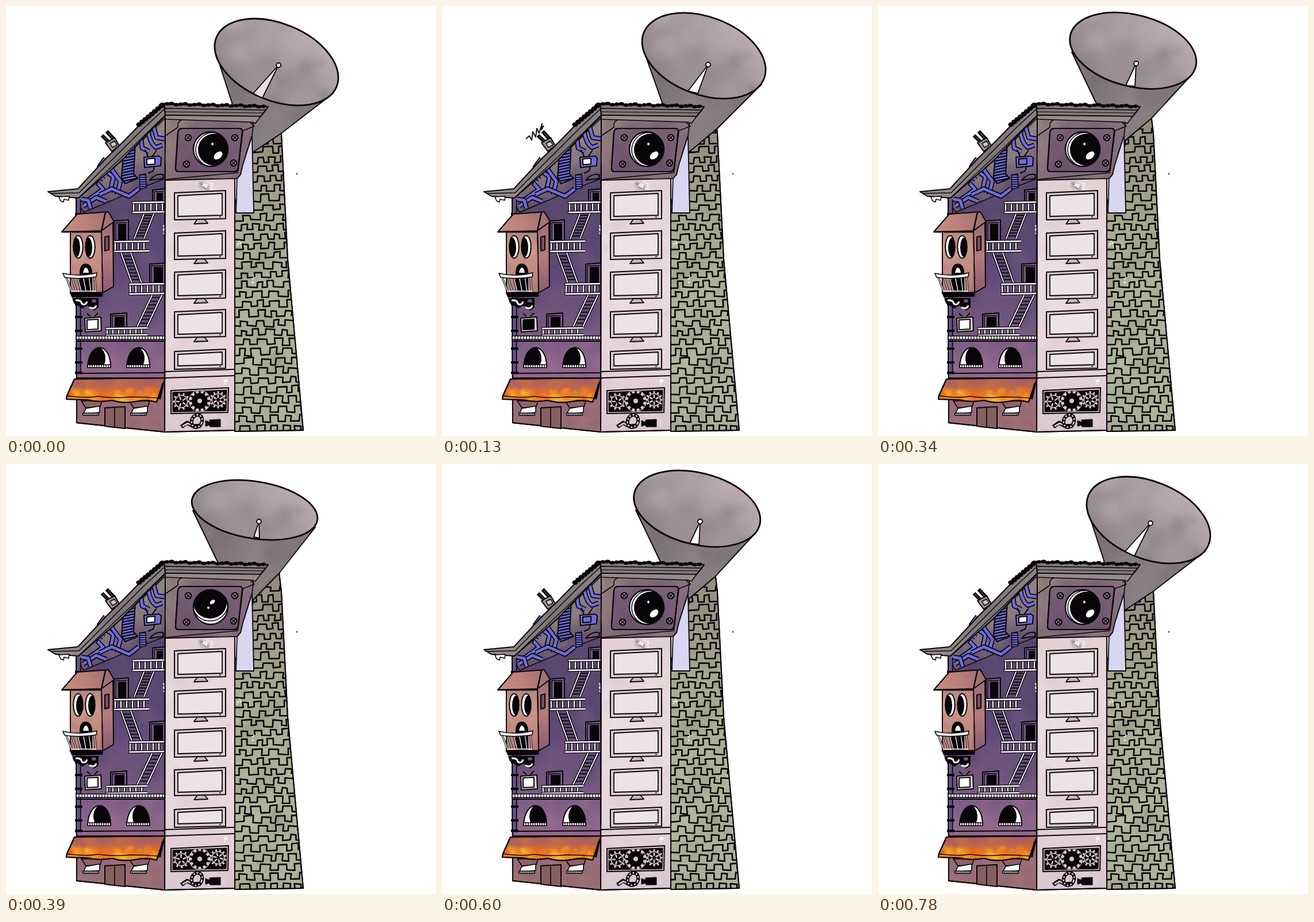
Recreate the animation shown at these times as an HTML page with a canvas. Size 748 px wide and 748 px high, loop 0.91 s.

```html
<!DOCTYPE html>
<html>
<head>
<meta charset="utf-8">
<style>
html, body { margin: 0; width: 100%; height: 100%; overflow: hidden; background: #fff; }
canvas { display: block; width: 100vmin; height: 100vmin; }
</style>
</head>
<body>
<canvas id="stage" width="748" height="748"></canvas>
<script>
const ctx = document.getElementById('stage').getContext('2d');
const STEP = 130, STEPS = 7, INK = '#080508', WHITE = '#fff', BLUE = '#6f6cda';

let seed;
const rnd = () => (seed = (seed * 16807) % 2147483647) / 2147483647;

function shape(d, fill, width = 2, ink = INK) {
  const path = typeof d === 'string' ? new Path2D(d) : d;
  if (fill) { ctx.fillStyle = fill; ctx.fill(path); }
  if (width) { ctx.strokeStyle = ink; ctx.lineWidth = width; ctx.stroke(path); }
  return path;
}
const line = (d, width = 2, ink = INK) => shape(d, null, width, ink);
const poly = (pts, fill, width, ink) => shape(`M${pts}Z`, fill, width, ink);
function oval(x, y, rx, ry, fill, width = 2, angle = 0, ink = INK) {
  const path = new Path2D();
  path.ellipse(x, y, rx, ry, angle, 0, 7);
  return shape(path, fill, width, ink);
}
function fade(x0, y0, x1, y1, ...colors) {
  const g = ctx.createLinearGradient(x0, y0, x1, y1);
  colors.forEach((c, i) => g.addColorStop(i / (colors.length - 1), c));
  return g;
}
function within(path, draw) {
  ctx.save();
  ctx.clip(path);
  draw();
  ctx.restore();
}

// Soft watercolour blotches inside a path; colours are "r,g,b".
function mottle(path, box, colors, count, size, alpha = .3) {
  const [x0, y0, w, h] = box;
  within(path, () => {
    for (let i = 0; i < count; i++) {
      const x = x0 + rnd() * w, y = y0 + rnd() * h, r = size * (.4 + rnd());
      const c = colors[i % colors.length];
      const g = ctx.createRadialGradient(x, y, 0, x, y, r);
      g.addColorStop(0, `rgba(${c},${alpha})`);
      g.addColorStop(1, `rgba(${c},0)`);
      ctx.fillStyle = g;
      ctx.fillRect(x - r, y - r, 2 * r, 2 * r);
    }
  });
}

function specks(x, y, w, h, count) {
  ctx.fillStyle = WHITE;
  for (let i = 0; i < count; i++)
    ctx.fillRect(x + rnd() * w, y + rnd() * h, 1 + rnd() * 2, 1 + rnd() * 2);
}

// Rim ellipse, cone edges (top and bottom ends), rod base and tip.
const DISHES = [
  { rim: [470.5, 97.5, 113, 67, .39], left: '364,78 393,168', right: '430,254 478,222 569,152', base: '430,152 446,160', tip: [474, 103] },
  { rim: [455.5, 86.5, 112, 67.6, .36], left: '349,72 383,168', right: '430,254 480,212 556,136', base: '428,148 445,152', tip: [463, 102] },
  { rim: [443.7, 77.7, 112.5, 62.2, .25], left: '337,80 380,170', right: '430,234 475,196 547,118', base: '431,138 447,140', tip: [449, 100] },
  { rim: [432.5, 80, 110.5, 49.5, .16], left: '325,81 367,168', right: '430,236 475,190 538,110', base: '431,127 441,129', tip: [440, 100] }
];

function tower() {
  const wall = poly('398,345 430,240 430,180 474,180 479,222 490,440 517,738 398,740',
    fade(0, 200, 0, 740, '#918c7e', '#a7aa90', '#afb499', '#a8b096'));
  mottle(wall, [398, 200, 120, 540], ['140,138,118', '188,194,168', '166,166,144'], 90, 24);
  within(wall, () => {
    for (let y = 218; y < 745; y += 16.7) {
      let up = 1, x = (y < 366 ? 426 : 394) + rnd() * 6;
      let d = `M${x - 8} ${y}`;
      while (x < 522) {
        const top = y + up * (3.5 + rnd() * 3) - (x - 400) * .02;
        d += `L${x} ${top}`;
        x += 8 + rnd() * 10;
        d += `L${x} ${top + rnd() * 3 - 1.5}`;
        x += rnd() * 3 - 1.5;
        up = -up;
      }
      line(d, 2.6);
    }
  });
  shape(wall, null);
  specks(401, 405, 8, 14, 8);
  specks(427, 470, 6, 10, 4);
}

function dish({ rim, left, right, base, tip }, rod) {
  const [x, y, rx, ry, angle] = rim;
  const cone = poly(`${left} 405,240 ${right}`, fade(x - 70, 150, x + 70, 190, '#7e7377', '#8a8084', '#7f767a'));
  mottle(cone, [350, 100, 200, 140], ['105,96,100', '155,145,149'], 25, 26, .22);
  const bowl = oval(x, y, rx, ry, fade(x - 85, y + 50, x + 40, y - 50, '#8d8286', '#a0959a', '#b8a9b0'), 0, angle);
  mottle(bowl, [x - 100, y - 75, 200, 75], ['190,174,182', '160,148,153'], 40, 27);
  mottle(bowl, [x - 100, y, 200, 75], ['130,120,124', '165,152,158'], 40, 25);
  oval(x, y, rx, ry, null, 2.8, angle);
  poly(`${base} ${tip}`, rod, 1.8);
  oval(...tip, 4, 4, rod || '#b5a8ae', 1.8);
}

function roof() {
  poly('275,171 456,175 452,181 443,192 277,190', '#827a79');
  poly('277,190 443,192 434,204 428,202 277,197', '#968c88', 1.5);
  poly('275,171 236,203 205,235 175,264 125,318 73,323 86,331 126,334 200,270 277,190', fade(277, 180, 100, 330, '#8a8283', '#7d7577', '#958d8d'));
  line('M277 178L452 181M277 178L240 212L127 325L78 326', 1.5);
  line('M277 184L447 186M277 190L213 252L130 330', 1.2);
  for (let i = 0; i < 23; i++) oval(272 + i * 8, 171 + i * .2 - (i % 3), 5, 3, INK, 0);
  for (let i = 0; i < 8; i++) oval(270 - i * 5.5, 174 + i * 4.6, 5, 4, INK, 0);
  shape('M92 332L110 331L109 338L101 336L100 341L95 339Z', WHITE, 1.6);
}

function pipe(d) {
  line(d, 8.5);
  line(d, 5, BLUE);
}

function pipes(tvLit) {
  const band = poly('277,195 277,300 236,316 135,359 122,336 200,270', fade(200, 240, 235, 310, '#928785', '#83747c', '#63506e'), 1.5);
  mottle(band, [130, 200, 147, 150], ['105,86,118', '152,140,138', '122,106,120'], 50, 18);
  ['M234 226L237 247L249 253', 'M247 213Q249 238 261 246L272 242', 'M257 211L262 229L276 231',
   'M173 265L162 280L187 297L181 324', 'M150 298L169 319L141 339', 'M199 259L183 283L199 305L193 328',
   'M134 348L157 333L174 340', 'M163 328L184 318L214 331L231 318', 'M147 352L143 338L131 336', 'M170 302L160 294L154 311'].forEach(pipe);
  const ladder = poly('204,258 225,238 222,292 229,300 207,309 201,298', BLUE);
  within(ladder, () => {
    for (let y = 236; y < 312; y += 5) line(`M198 ${y + 5}L232 ${y - 2}`, 2.4);
  });
  const coil = poly('232,294 243,292 244,316 233,319', BLUE, 1.5);
  within(coil, () => { for (let y = 294; y < 320; y += 4) line(`M230 ${y}L246 ${y}`, 1.5); });
  line('M247 262L242 250M254 262L262 251M258 280L256 287L247 291');
  poly('240,263 266,261 270,264 269,278 241,281', BLUE);
  poly('245,266 259,265 259,275 245,276', tvLit ? WHITE : '#7770c4', 2);
  shape('M250 303Q262 289 274 294L273 300Z', '#6c5872');
}

function chimney(sparking) {
  poly('173,238 189,229 197,243 184,253', '#988d8b');
  poly('181,239 189,235 193,242 185,246', '#d2c8c6', 1.5);
  line('M167 225L178 236M175 218L187 231', 6.5);
  line('M169 227L177 235M177 220L185 229', 1, '#77706f');
  if (sparking) line('M146 231L152 226L156 233L158 219L163 228L165 213L169 221L174 205L173 215L177 208', 1.9);
}

function doorway(x, y, w, h) {
  poly(`${x},${y + 2} ${x + w},${y} ${x + w},${y + h} ${x},${y + h}`, '#725a82');
  ctx.fillStyle = INK;
  ctx.fillRect(x + 7, y + 7, w - 11, h - 7);
  line(`M${x + 3} ${y + h}V${y + 5}H${x + w - 3}`, 1.3);
}

function rail(x0, x1, y, h) {
  for (let x = x0 + 3; x < x1; x += 10) {
    line(`M${x} ${y}V${y + h}`, 4.6);
    line(`M${x} ${y}V${y + h}`, 2.2, WHITE);
  }
  for (const dy of [0, h]) {
    line(`M${x0} ${y + dy + 1}L${x1} ${y + dy}`, 5);
    line(`M${x0 + 1} ${y + dy + 1}L${x1} ${y + dy}`, 2.5, WHITE);
  }
}

function stairs(x0, y0, x1, y1) {
  const w = 17;
  for (let i = 1; i < 9; i++) {
    const x = x0 + (x1 - x0) * i / 9, y = y0 + (y1 - y0) * i / 9;
    line(`M${x} ${y}h${w}`, 1.8);
  }
  for (const dx of [0, w]) {
    const d = `M${x0 + dx} ${y0}L${x1 + dx} ${y1}`;
    line(d, 4.4);
    line(d, 1.8, WHITE);
  }
}

function arch(cx, lookRight) {
  const dome = shape(`M${cx - 20} 628C${cx - 18} 583 ${cx + 20} 583 ${cx + 20} 628Z`, WHITE, 0);
  within(dome, () => oval(cx + (lookRight ? 8 : -7), 613, 18, 22, INK, 0));
  shape(dome, null, 2);
  hatch(cx - 20, 624, 40, 5);
}

function hatch(x, y, w, h, gap = 4) {
  ctx.fillStyle = WHITE;
  ctx.fillRect(x, y, w, h);
  for (let i = 0; i <= w; i += gap) line(`M${x + i} ${y}v${h}`, 1.3);
  line(`M${x} ${y}h${w}v${h}h${-w}z`, 1.3);
}

function sideWall(pose) {
  const wall = poly('277,190 276,741 123,725 122,334 200,270',
    fade(0, 300, 0, 730, '#5d4a70', '#59466e', '#62497a', '#75587f', '#916a8c', '#9a6e74'));
  mottle(wall, [122, 300, 155, 280], ['82,64,104', '116,92,132', '80,70,114', '118,88,118'], 80, 22);
  mottle(wall, [122, 583, 155, 58], ['162,112,150', '124,94,150', '140,98,128'], 45, 16);
  mottle(wall, [122, 685, 155, 50], ['168,118,114', '138,94,104'], 25, 15);
  shape(wall, null);
  specks(273, 375, 3, 22, 12);
  pipes(pose.tv);

  line('M126 337V641', 9);
  line('M126 337V641', 5.5, '#64538a');
  for (const y of [362, 519, 541, 565, 596, 620, 638]) line(`M120 ${y}h13`, 4);
  doorway(255, 318, 22, 24);
  doorway(188, 372, 25, 36);
  doorway(250, 447, 27, 36);
  doorway(182, 534, 28, 27);
  stairs(241, 359, 223, 405);
  stairs(200, 429, 219, 482);
  stairs(255, 501, 228, 558);
  rail(219, 277, 341, 17);
  rail(187, 249, 409, 17);
  rail(213, 277, 483, 17);
  rail(173, 246, 560, 12);
  hatch(122, 574, 155, 6, 5);
  line('M122 583H277M122 639L277 638M122 647L277 647');
  arch(162, pose.lookRight);
  arch(230, pose.lookRight);
  poly('137,543 165,541 166,565 138,567', '#d8cbd0');
  poly('141,546 160,545 160,562 141,563', pose.lamp ? WHITE : INK);
  line('M141 535L147 540M160 534L154 540', 2);
}

function faceHouse(lookRight) {
  poly('166,391 186,374 187,488 168,499', fade(0, 380, 0, 490, '#9d6f78', '#b67c7c', '#8e6074'));
  const front = poly('112,391 166,391 168,499 112,500', fade(0, 390, 0, 500, '#b5847c', '#c99a8e', '#c0877f', '#b1747a'));
  mottle(front, [112, 390, 56, 110], ['212,162,146', '172,120,120', '202,138,120'], 28, 13);
  poly('97,393 124,362 178,358 188,375 166,391', fade(100, 390, 180, 360, '#c68c7f', '#bb8079', '#9c6f72'));
  line('M97 393H166M166 391L173 359', 2.5);
  for (const x of [125.5, 146.5]) {
    const eye = oval(x, 419, 8.3, 19.5, WHITE, 0);
    within(eye, () => oval(x + (lookRight ? 3.5 : -3.5), 420, 7, 17, INK, 0));
    shape(eye, null, 2);
  }
  poly('172,402 179,400 179,424 172,426', '#765064');
  shape('M129 497V463Q130 449 139 449Q148 450 149 463V497Z', INK);
  shape('M134 464Q136 455 139 455Q143 456 144 464Z', WHITE, 0);
  for (let i = 0; i < 6; i++) {
    const d = `M${104 + i * 10} 470L${114 + i * 8.4} 496`;
    line(d, 3.4);
    line(d, 1.3, WHITE);
  }
  shape('M99 465Q128 472 158 464L157 471Q126 476 102 472Z', WHITE, 1.6);
  line('M113 496H157', 1.6, WHITE);
  poly('111,498 168,498 168,505 115,507', INK, 1);
  shape('M115 508H161V524L153 530L142 521L133 526L118 517Z', INK, 0);
  line('M121 512Q131 511 132 518Q138 522 141 514M145 524Q154 529 157 521', 3, WHITE);
  oval(153, 513, 5, 4, '#665483', 2);
}

function groundFloor() {
  poly('172,699 207,697 207,735 172,731', '#85605f');
  line('M189 698V733', 1.6);
  for (const x of [134, 217]) {
    poly(`${x - 3},687 ${x + 33},687 ${x + 30},697 ${x + 5},699`, '#8f6266', 1.6);
    poly(`${x + 5},700 ${x + 29},696 ${x + 29},707 ${x},710`, WHITE, 1.6);
    hatch(x, 708, 27, 4, 3);
  }
  const awning = shape('M119 649L277 647L270 666L262 689Q244 684 226 688Q203 692 185 686Q160 690 140 685L105 684L106 678Z',
    fade(0, 648, 0, 690, '#a55f60', '#bc6650', '#ec7a20', '#f9a42a'));
  mottle(awning, [106, 668, 165, 22], ['255,205,45', '240,100,20', '255,160,30', '225,80,25'], 90, 8, .55);
  mottle(awning, [115, 648, 160, 20], ['180,100,80', '160,90,105', '212,112,60'], 36, 13);
  shape(awning, null, 2.2);
  line('M106 678Q140 683 160 679Q190 683 216 680Q243 680 264 682', 1.6);
  line('M273 657L267 684', 4);
}

function gear(x, y, r, teeth, turn, color) {
  ctx.save();
  ctx.translate(x, y);
  ctx.rotate(turn);
  ctx.fillStyle = color;
  for (let i = 0; i < teeth; i++) {
    ctx.rotate(Math.PI * 2 / teeth);
    ctx.fillRect(-1.6, -r, 3.2, r * .4);
  }
  oval(0, 0, r * .76, r * .76, color, 0);
  ctx.restore();
}

// Thin-lined wheel with spokes and stub teeth.
function wheel(x, y, r, teeth, turn, color) {
  oval(x, y, r * .72, r * .72, null, 1.6, 0, color);
  for (let i = 0; i < teeth; i++) {
    const a = turn + i * 2 * Math.PI / teeth, c = Math.cos(a), s = Math.sin(a);
    line(`M${x + c * r * .76} ${y + s * r * .76}L${x + c * r} ${y + s * r}`, 3, color);
    if (i % 2) line(`M${x + c * 3} ${y + s * 3}L${x + c * r * .6} ${y + s * r * .6}`, 2.6, color);
  }
}

function monitor(top, bottom, stand) {
  poly(`293,${top + 4} 382,${top} 382,${bottom - 2} 293,${bottom}`, '#dccbd0');
  poly(`299,${top + 9} 376,${top + 5} 376,${bottom - 8} 299,${bottom - 6}`, '#ebe3e6', 1.8);
  line(`M371 ${bottom - 5}h3`, 1.5);
  if (stand) poly(`333,${bottom - 1} 345,${bottom - 1} 351,${bottom + 6} 327,${bottom + 7}`, '#cbb8bf', 1.8);
}

function frontWall(turn) {
  const wall = poly('277,190 398,195 398,738 276,741', fade(0, 300, 0, 740, '#e3d1d3', '#ebdce0', '#e8d6dc', '#dac6ce'));
  mottle(wall, [277, 300, 121, 440], ['242,226,231', '212,190,198', '230,203,215', '225,210,210'], 110, 22);
  shape(wall, null);
  mottle(wall, [338, 306, 22, 14], ['120,110,110'], 8, 7, .4);
  specks(340, 305, 20, 14, 20);
  specks(378, 647, 7, 10, 10);
  [[321, 372], [391, 441], [459, 510], [528, 577], [597, 632]].forEach(([a, b], i) => monitor(a, b, i < 4));
  line('M277 636L398 632M277 647L398 643');

  poly('287,669 387,664 386,707 287,709', '#d6c2ca');
  const panel = poly('290,672 384,668 383,704 290,706', INK, 1);
  within(panel, () => {
    const pink = '#d9c4cb';
    wheel(305, 688, 15, 10, turn, pink);
    wheel(369, 685, 15, 12, -turn, pink);
    oval(337, 687, 19, 19, pink, 0);
    gear(337, 687, 18, 12, turn, INK);
    oval(337, 687, 4, 4, pink, 0);
  });
  line('M305 732L315 725L326 731L339 730', 7);
  line('M307 731L316 726L326 731', 3, '#d8c7cd');
  oval(332, 722, 9, 11, null, 6, .4);
  ctx.setLineDash([3, 3]);
  oval(332, 722, 9, 11, null, 2.5, .4, '#e3d3d9');
  ctx.setLineDash([]);
  poly('347,721 354,724 354,720 373,719 373,732 355,732 354,729 347,731', INK, 1);
}

function lens(lookDown) {
  const hood = shape('M277 193L300 197L422 198Q431 199 430 207L428 225L412 276L408 293L402 300L277 303Z', fade(280, 200, 420, 300, '#95857f', '#806678', '#8a707c'), 2);
  mottle(hood, [277, 195, 150, 108], ['116,88,112', '152,126,132', '122,98,112'], 45, 18);
  shape('M277 226L299 211Q297 199 310 197L420 198L432 209L412 217L403 290L295 300L277 302', null, 1.6);
  const plate = shape('M306 213H406Q412 213 411 220L404 281Q403 288 397 288H300Q294 288 295 281L299 220Q300 213 306 213Z', fade(0, 213, 0, 288, '#7a6176', '#6f536e'));
  mottle(plate, [295, 213, 115, 75], ['132,104,126', '96,72,98'], 30, 16, .25);
  shape(plate, null, 2.2);
  for (const [x, y] of [[317, 229], [398, 229], [314, 275], [396, 273]]) {
    oval(x, y, 5.3, 5.3, '#9b858f');
    line(`M${x - 3} ${y - 3}l6 6m0-6l-6 6`, 1.7);
  }
  const ball = oval(356, 249, 30, 30, WHITE, 0);
  within(ball, () => {
    const [x, y] = lookDown ? [355, 243] : [361, 250];
    oval(x, y, 31, 30, null, 1.5);
    oval(x + (lookDown ? 0 : 2), y - (lookDown ? 2 : 0), 29, 28, INK, 0);
  });
  shape(ball, null, 2.4);
  if (lookDown) {
    oval(359, 240, 5, 3, WHITE, 0, -.6);
    oval(352, 250, 2, 2, WHITE, 0);
  } else {
    oval(369, 260, 8.5, 5.5, WHITE, 0, -.7);
    oval(359, 240, 1.8, 2.5, WHITE, 0);
  }
}

function draw(step) {
  const swing = 3 - Math.abs(step - 3);
  const pose = {
    sparking: swing === 1,
    lamp: swing !== 1,
    tv: swing !== 2,
    lookRight: swing > 1,
    lookDown: swing === 3,
    rod: step === 5 ? null : step % 3 || step === 6 ? WHITE : '#e9e0e3'
  };
  seed = 4711;
  ctx.fillStyle = WHITE;
  ctx.fillRect(0, 0, 748, 748);
  ctx.lineJoin = 'round';
  tower();
  dish(DISHES[swing], pose.rod);
  poly('404,228 428,226 431,360 400,360', '#d9d6f2', 1.8);
  sideWall(pose);
  frontWall(pose.lookDown ? .26 : 0);
  lens(pose.lookDown);
  roof();
  chimney(pose.sparking);
  faceHouse(pose.lookRight);
  groundFloor();
  ctx.fillStyle = INK;
  ctx.fillRect(505, 291, 2, 2);
}

let shown = -1;
function tick() {
  const step = Math.floor(performance.now() / STEP) % STEPS;
  if (step !== shown) draw(shown = step);
  requestAnimationFrame(tick);
}
tick();
</script>
</body>
</html>
```
